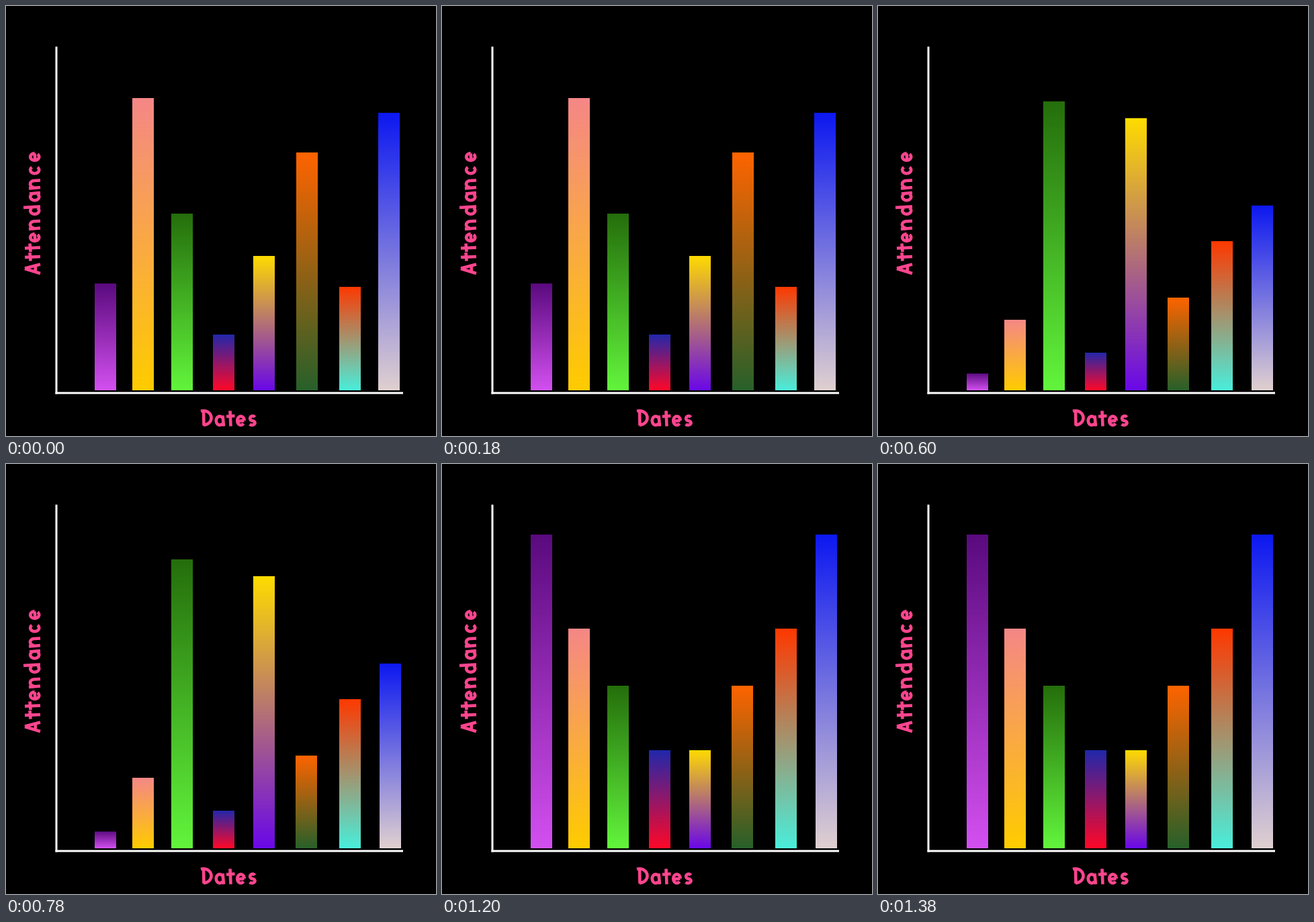
Animation of 640x640 px, one loop 1500 ms. Source, as a matplotlib script:

```python
import numpy as np
import matplotlib.pyplot as plt
from matplotlib.animation import FuncAnimation
from matplotlib.colors import to_rgb
from matplotlib.path import Path

SIZE, DPI = 640, 100
PX = 72 / DPI  # points per pixel
FLOOR, WIDTH = 572.5, 32
PINK = "#ff458e"

# Left edge, sideways drift in the second half, top colour, bottom colour
BARS = [
    (131.5, 0, "#5a0a7e", "#d350f0"),
    (188, 0, "#f58787", "#ffcc00"),
    (246, 0, "#256e0c", "#62f53c"),
    (308, 0, "#2028ac", "#ff0828"),
    (367.5, 0, "#ffdc00", "#6a08e8"),
    (432, -1, "#ff6400", "#28602a"),
    (495.5, 0, "#ff3800", "#4aeedb"),
    (553.5, 2.3, "#0c18f0", "#e0d0d0"),
]


def mirror(*half):
    return half + half[::-1]


# Bar tops: three uneven charts, then a peak and a valley
TOPS = [
    (412.5, 137, 308.5, 489, 372, 217.5, 417.5, 159),
    (345.5, 234, 435, 293.5, 467, 394.5, 159.5, 427.5),
    (547, 467, 142, 515.5, 167, 433.5, 350, 297),
    mirror(441, 376, 260, 107),
    mirror(105, 245, 330, 425.5),
]


def line(x0, y0, x1, y1):
    return np.array([(x0, y0), (x1, y1)], float)


def arc(cx, cy, rx, ry, start, end):
    t = np.radians(np.linspace(start, end, 40))
    return np.column_stack([cx + rx * np.cos(t), cy + ry * np.sin(t)])


# Brush letters: advance, then strokes on a baseline at y = 0
BOWL = arc(8, 8.3, 5.2, 6.5, 40, 320)
GLYPHS = {
    "A": (20.5, [line(2, 0, 9, 23), line(9.5, 23, 15.5, 0), line(3, 7.5, 15, 7)]),
    "D": (20, [line(4, 24, 4.5, 1), arc(4, 12.5, 11.5, 10.5, 110, -90)]),
    "a": (18, [BOWL, line(12.5, 16, 14, 0)]),
    "c": (19.5, [BOWL]),
    "d": (20.5, [BOWL, line(12.5, 25, 14, 0)]),
    "e": (18, [arc(8, 8.3, 5.2, 6.5, 0, 320), line(3, 7.5, 13, 8.5)]),
    "n": (22, [line(2.5, 17, 4, 0), arc(9, 9, 5, 6, 180, 0), line(14, 9, 14.5, 0)]),
    "s": (15, [arc(7.5, 11.7, 3.8, 3.5, 30, 270), arc(6.5, 5, 4.5, 3.2, 80, -140)]),
    "t": (13.5, [line(5.5, 23, 6.5, 0), line(0, 14.5, 12.5, 15.5)]),
}


def write(word, x, y, upward=False):
    pen = 0
    for char in word:
        advance, strokes = GLYPHS[char]
        for stroke in strokes:
            u, v = stroke.T
            u = u + pen
            xs, ys = (x - v, y - u) if upward else (x + u, y - v)
            ax.plot(xs, ys, color=PINK, lw=4.6 * PX, solid_capstyle="butt")
        pen += advance


def gradient(top, bottom):
    t = np.linspace(0, 1, 256)[:, None, None]
    return (1 - t) * np.array(to_rgb(top)) + t * np.array(to_rgb(bottom))


fig = plt.figure(figsize=(SIZE / DPI, SIZE / DPI), dpi=DPI, facecolor="black")
ax = fig.add_axes([0, 0, 1, 1])
ax.axis("off")

bars = [ax.imshow(gradient(top, bottom), aspect="auto",
                  extent=(x, x + WIDTH, FLOOR, FLOOR - 1))
        for x, _, top, bottom in BARS]

axis_style = dict(color="white", lw=3 * PX, solid_capstyle="butt", snap=False)
ax.plot([75, 75], [60.5, 577.5], **axis_style)
ax.plot([73.5, 591], [576, 576], **axis_style)
write("Attendance", 51, 400, upward=True)
write("Dates", 290, 625.5)

ax.set_xlim(0, SIZE)
ax.set_ylim(SIZE, 0)


def update(step):
    for bar, (x, drift, *_), top in zip(bars, BARS, TOPS[step]):
        left = x + drift * (step >= len(TOPS) // 2)
        right = left + WIDTH
        bar.set_extent((left, right, FLOOR, top))
        # The clip keeps edges that fall between pixels soft
        box = [(left, top), (right, top), (right, FLOOR), (left, FLOOR), (left, top)]
        bar.set_clip_path(Path(box), ax.transData)
    return bars


anim = FuncAnimation(fig, update, frames=len(TOPS), interval=300,
                     repeat=True, repeat_delay=0)
plt.show()
```
